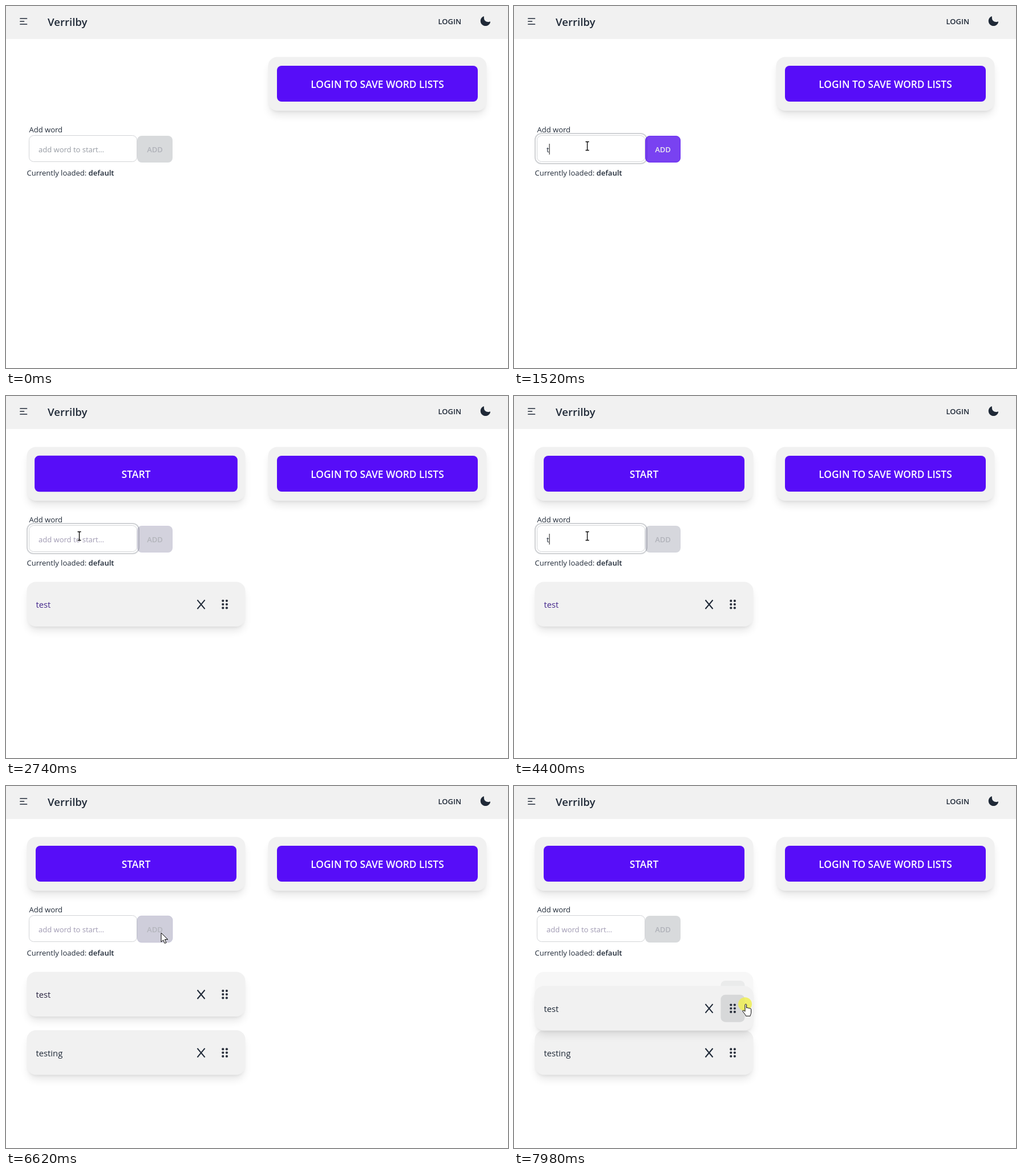
An HTML page that plays this animation: 880x636 px, repeating every 8 s.

```html
<!DOCTYPE html>
<html lang="en">
<head>
<meta charset="utf-8">
<title>Word list</title>
<style>
  html, body { margin: 0; width: 100%; height: 100%; overflow: hidden; background: #fff; }
  svg { display: block; width: 880px; height: 636px; }
  text { font: 13px "Open Sans", "Noto Sans", sans-serif; fill: #1f2937; white-space: pre; }
  .semi { font-weight: 600; }
  .big { font-size: 17.35px; font-weight: 600; fill: #fff; text-anchor: middle; }
  .word { font-size: 14.8px; }
  .pop { transform-box: fill-box; transform-origin: center; }
  .line { fill: none; stroke: #1f2937; stroke-width: 1.7; stroke-linecap: round; }
  .far { filter: blur(7.5px); opacity: .1; }
  .near { filter: blur(3px); opacity: .1; }
  .outline { fill: #fff; stroke: #000; stroke-width: 1; stroke-linejoin: round; }
</style>
</head>
<body>
<svg id="stage" viewBox="0 0 880 636"></svg>
<script>
const box = (x, y, w, h, r, attrs) =>
  `<rect x="${x}" y="${y}" width="${w}" height="${h}" rx="${r}" ${attrs}/>`;

const card = (x, y, w, h) =>
  box(x + 3, y + 13, w - 6, h - 6, 13, 'class="far"') +
  box(x + 4, y + 8, w - 8, h - 8, 12, 'class="near"') +
  box(x, y, w, h, 16, 'fill="#f1f1f1"');

const bigButton = (x, label) =>
  `<g class="pop">${box(x, 105, 352, 63, 8, 'fill="#570df8"')}
   <text class="big" x="${x + 176}" y="143.5">${label}</text></g>`;

// One row of the word list, with its top edge at y = 0.
const dots = [0, 1, 2, 3, 4, 5].map(i =>
  `<circle cx="${380.3 + i % 2 * 6.6}" cy="${33.4 + (i >> 1) * 6.2}" r="2.1" fill="#2a303c"/>`).join('');
const row = (id, word) => `<g id="${id}">
  ${card(36.5, 0, 383, 78.5)}
  ${box(362.5, 15.5, 42, 48, 8, 'class="hover" fill="#2a323c" opacity="0"')}
  <text class="word" x="52.5" y="45.5">${word}</text>
  <g class="pop"><path class="line" style="stroke-width:2;stroke-linecap:butt" d="M335.5 32l13 15.5m0-15.5l-13 15.5"/></g>
  <g class="pop">${dots}</g></g>`;

const stage = document.getElementById('stage');
stage.innerHTML = `
  <rect width="880" height="58" fill="#f1f1f1"/>
  <path class="line" d="M25 22h11.5M25 27h6.5M25 32h11.5"/>
  <text class="semi" style="font-size:18.6px" x="73" y="34.5">Verrilby</text>
  <text class="semi" x="757.5" y="31.5">LOGIN</text>
  <path transform="translate(829.9 16.2) scale(.87)" fill="#1f2937" d="M21.6 13a1 1 0 0 0-1-.1
    8 8 0 0 1-3.4.7A8.1 8.1 0 0 1 9.1 5.5a8.6 8.6 0 0 1 .2-2A1 1 0 0 0 8 2.4 10.1 10.1 0 1 0 22 14a1 1 0 0 0-.4-1Z"/>
  ${card(459.5, 89.5, 383, 94.5)}${bigButton(475, 'LOGIN TO SAVE WORD LISTS')}
  <g id="start">${card(36.5, 89.5, 383, 94.5)}${bigButton(52, 'START')}</g>
  <text x="40.5" y="222">Add word</text>
  <text x="36.5" y="298">Currently loaded: <tspan class="semi">default</tspan></text>
  ${box(37, 224, 196, 53, 11, 'id="ring" fill="none" stroke="#d0d2d5" stroke-width="2"')}
  ${box(40.5, 227.5, 189, 46, 8, 'fill="#fff" stroke="#d2d4d7"')}
  <text id="hint" x="57" y="256.5">add word to start...</text>
  <text id="value" x="57" y="256.5"></text>
  <rect id="caret" y="242" width="1" height="19" fill="#111"/>
  <g id="add" class="pop">
    ${box(230, 228, 62, 47, 8, 'fill="#2a323c" opacity=".18"')}
    ${box(230.5, 228.5, 61, 46, 7.5, 'id="addFill"')}
    <text id="addText" class="semi" text-anchor="middle" x="261" y="256.5">ADD</text>
  </g>
  ${row('second', 'testing')}${row('first', 'test')}${row('drag', 'test')}
  <g id="pointer">
    <circle id="press" r="12" fill="#eeee55" opacity=".85"/>
    <path id="arrow" class="outline" d="M0 0v16l3.7-3.4 2.5 5.8 2.7-1.1-2.5-5.7h5.2Z"/>
    <path id="beam" d="M-3 -7.5h2.2l.8 .8.8-.8h2.2M0 -7v14M-3 7.5h2.2l.8-.8.8.8h2.2" fill="none" stroke="#000" stroke-width="1.3"/>
    <path id="hand" class="outline" d="M0 1.2C0-.3 2.6-.3 2.6 1.2V7c.4-1.2 2.6-1 2.8.4.6-1 2.6-.7 2.8.7
      .8-.8 2.5-.3 2.5 1.2V15c0 2.2-1.3 3.4-1.6 6H1.4C1 18.6-2 15.8-3.9 12.9c-.9-1.4.8-2.6 2-1.5L0 13Z"/>
  </g>`;

const el = {};
stage.querySelectorAll('[id]').forEach(e => el[e.id] = e);
const show = (e, on) => e.style.display = on ? '' : 'none';
const clamp = p => Math.min(1, Math.max(0, p));
const easeOut = p => 1 - (1 - clamp(p)) ** 3;
const smooth = p => p * p * (3 - 2 * p);

const SUBMIT1 = 2600, PRESS = 6420, SUBMIT2 = 6490, GRAB = 7720;
const keys = [[0, ''], [1460, 't'], [1600, 'te'], [1820, 'tes'], [1910, 'test'], [SUBMIT1, ''],
  [4400, 't'], [4560, 'te'], [4720, 'tes'], [4820, 'test'], [5220, 'testi'], [5250, 'testin'],
  [5390, 'testing'], [SUBMIT2, '']];
const path = [[90, 330, 609], [500, 128.5, 246], [5920, 128.5, 246], [6190, 272, 258], [6630, 272, 258],
  [6890, 588, 494], [7020, 592, 459], [7220, 592, 459], [7640, 405, 358.5], [8001, 405, 358.5]];

function pointerAt(t) {
  const i = Math.max(1, path.findIndex(k => k[0] > t));
  const [t0, x0, y0] = path[i - 1], [t1, x1, y1] = path[i];
  const p = smooth(clamp((t - t0) / (t1 - t0)));
  return [x0 + (x1 - x0) * p, y0 + (y1 - y0) * p];
}

// Button bounce: .98 up to 1.02, then settling at 1.
function bounce(age) {
  const p = age / 250, q = v => 1 - (1 - v) ** 2;
  if (p < 0 || p > 1) return 1;
  return p < .4 ? .98 + .04 * q(p / .4) : 1.02 - .02 * q((p - .4) / .6);
}
const scalePops = (g, s) => g.querySelectorAll('.pop').forEach(e => e.style.transform = `scale(${s})`);

function draw(t) {
  const focused = t >= 550 && t < PRESS;
  const value = keys.findLast(k => k[0] <= t)[1];
  show(el.ring, focused);
  show(el.hint, !value);
  el.hint.style.fill = t < SUBMIT1 ? '#969ba3' : '#9f99b2';
  el.value.textContent = value;
  const typed = keys.findLast(k => k[0] <= t && k[1]);
  const blinkStart = typed ? typed[0] : 550;
  show(el.caret, focused && Math.floor((t - blinkStart) / 515) % 2 === 0);
  el.caret.setAttribute('x', 57 + (value ? el.value.getComputedTextLength() : 0));

  const lit = easeOut((t - 1460) / 170) - easeOut((t - SUBMIT1) / 210)
    + easeOut((t - 4400) / 170) - easeOut((t - SUBMIT2) / 210);
  const hover = easeOut((t - 6110) / 200) * 100;
  const fill = `color-mix(in srgb, #4406cb ${hover}%, #570df8)`;
  Object.assign(el.addFill.style, { fill, stroke: fill, fillOpacity: lit, strokeOpacity: lit });
  el.addText.style.fill = `color-mix(in srgb, #fff ${lit * 100}%, #b0b2b9)`;
  const held = t >= PRESS && t < SUBMIT2;
  el.add.style.transform = `scale(${held ? .97 : bounce(t - SUBMIT2)})`;

  show(el.start, t >= SUBMIT1);
  scalePops(el.start, bounce(t - SUBMIT1));
  const grabbed = t >= GRAB;
  const shift = grabbed ? 24.5 * ((t - GRAB) / 260) ** 1.5 : 0;
  const place = (g, on, y, born) => {
    show(g, on);
    g.setAttribute('transform', `translate(0 ${y})`);
    scalePops(g, bounce(t - born));
    g.querySelector('.hover').style.opacity = g === el.second ? 0 : .13 * easeOut((t - 7590) / 150);
  };
  place(el.first, t >= SUBMIT1, 326.5, SUBMIT1);
  place(el.second, t >= SUBMIT2, 429, SUBMIT2);
  place(el.drag, grabbed, 326.5 + shift, SUBMIT1);
  el.first.style.opacity = grabbed ? .5 : 1;
  el.first.querySelector('text').style.fill = t < SUBMIT2 ? '#44288c' : '#2a2440';

  const [x, y] = pointerAt(t);
  const inside = (l, top, r, b) => x > l && x < r && y > top && y < b;
  const beam = inside(40, 227, 230, 274);
  const hand = inside(230, 228, 292, 275) && t < SUBMIT2 || inside(322, 342, 406, 390);
  show(el.pointer, t >= 90);
  el.pointer.setAttribute('transform', `translate(${x} ${y + shift})`);
  show(el.beam, beam);
  show(el.hand, hand);
  show(el.arrow, !beam && !hand);
  show(el.press, t >= 530 && t < 600 || held || t >= GRAB - 40);
}

function tick() {
  draw(performance.now() % 8000);
  requestAnimationFrame(tick);
}
tick();
</script>
</body>
</html>
```
